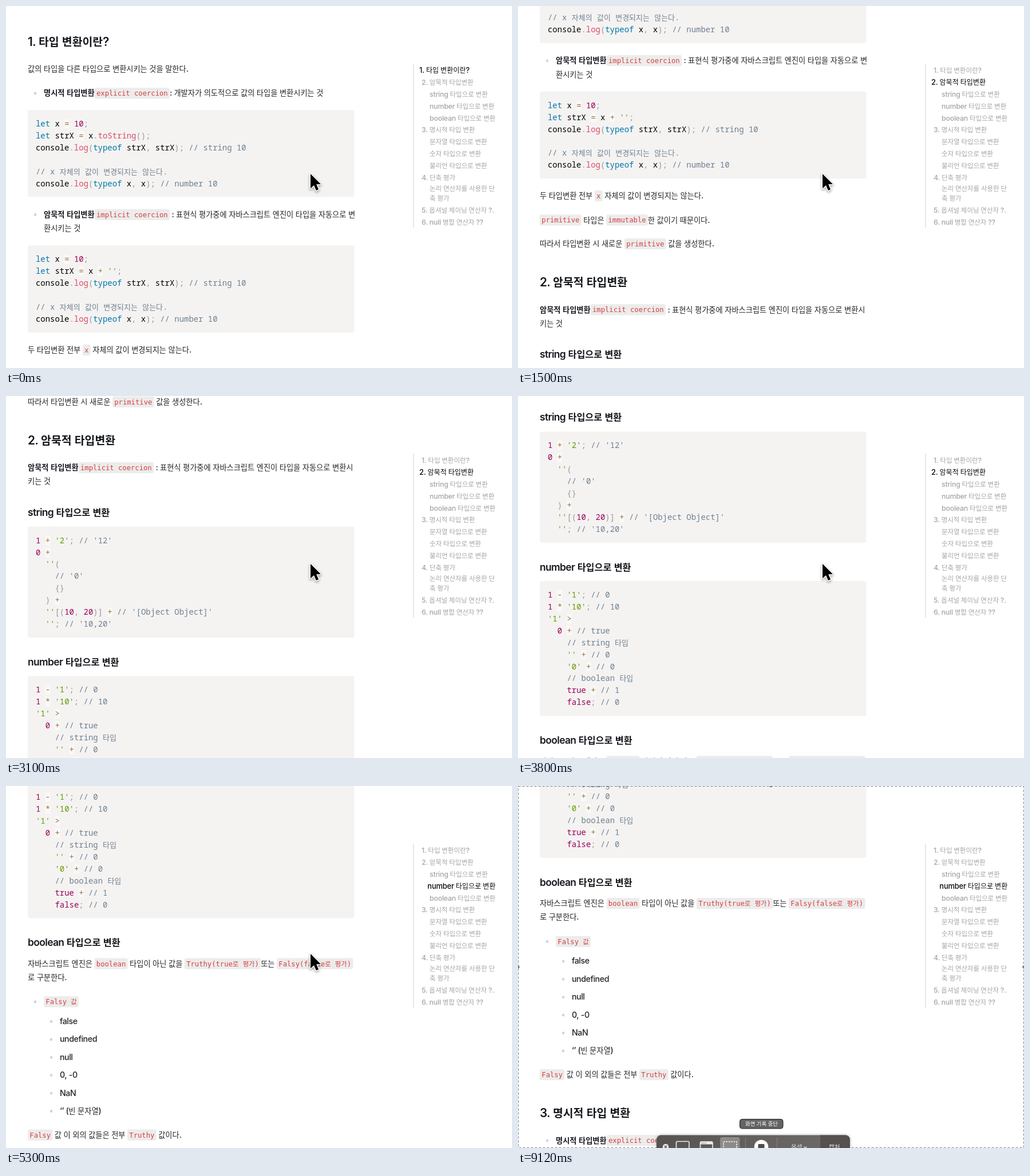
Write an HTML page with a canvas that moves like this. It is 884 by 634 pixels and loops after 9230 ms.

```html
<!DOCTYPE html>
<html lang="ko">
<head>
<meta charset="utf-8">
<style>
  html, body { margin: 0; width: 100%; height: 100%; overflow: hidden; background: #fff; }
  canvas { display: block; }
</style>
</head>
<body>
<canvas id="stage" width="884" height="634"></canvas>
<script>
const W = 884, H = 634, LOOP = 9230;
const ctx = document.getElementById('stage').getContext('2d');

const SANS = 'Inter, sans-serif';
const font = (size, o = {}) => ({ size, family: SANS, weight: 500, ls: -0.03, gap: 0.25, color: '#212529', ...o });
const mono = (size, family, color) => font(size, { family: family + ', monospace', ls: 0, gap: 0.601, color });
const BODY = font(14.2);
const BOLD = font(14.2, { weight: 700, color: '#181b20' });
const H2 = font(20.8, { weight: 700, ls: -0.04, color: '#14171c' });
const H3 = font(17.4, { weight: 700, ls: -0.035, color: '#14171c' });
const TOC = font(12.3, { ls: -0.015, gap: 0.235 });
const BADGE = mono(12.2, '"DejaVu Sans Mono"', '#d63f43');
const CODE = mono(13.93, '"Noto Sans Mono"', '#000');
const COLORS = {
  comment: '#708090', string: '#669900', keyword: '#0077aa', constant: '#990055',
  call: '#dd4a68', operator: '#9a6e3a', punctuation: '#999999'
};
const TOKEN = new RegExp([
  '(?<comment>//.*)', "(?<string>'[^']*')", '(?<keyword>let|typeof)',
  '(?<constant>true|false|\\d+)', '(?<call>\\w+(?=\\())', '(?<operator>[=+*>-])',
  '(?<punctuation>[.,;()\\[\\]{}])', '\\w+', ' +'
].join('|'), 'g');

const conversion = expr => [
  'let x = 10;', `let strX = ${expr};`, 'console.log(typeof strX, strX); // string 10', '',
  '// x 자체의 값이 변경되지는 않는다.', 'console.log(typeof x, x); // number 10'
];
const toStringCode = [
  "1 + '2'; // '12'", '0 +', "  ''(", "    // '0'", '    {}', '  ) +',
  "  ''[(10, 20)] + // '[Object Object]'", "  ''; // '10,20'"
];
const toNumberCode = [
  "1 - '1'; // 0", "1 * '10'; // 10", "'1' >", '  0 + // true', '    // string 타입',
  "    '' + // 0", "    '0' + // 0", '    // boolean 타입', '    true + // 1', '    false; // 0'
];
const explicitItem = '*명시적 타입변환*`explicit coercion`: 개발자가 의도적으로 값의 타입을 변환시키는 것';

const page = [
  [h2, 63, '1. 타입 변환이란?'],
  [para, 110, '값의 타입을 다른 타입으로 변환시키는 것을 말한다.'],
  [item, 152.5, explicitItem],
  [code, 206, conversion('x.toString()')],
  [item, 365, '*암묵적 타입변환*`implicit coercion` : 표현식 평가중에 자바스크립트 엔진이 타입을 자동으로 변'],
  [para, 389.5, '환시키는 것', 66],
  [code, 443.4, conversion("x + ''")],
  [para, 602, '두 타입변환 전부 `x` 자체의 값이 변경되지는 않는다.'],
  [para, 644.2, '`primitive` 타입은 `immutable`한 값이기 때문이다.'],
  [para, 686, '따라서 타입변환 시 새로운 `primitive` 값을 생성한다.'],
  [h2, 753.8, '2. 암묵적 타입변환'],
  [para, 801.2, '*암묵적 타입변환*`implicit coercion` : 표현식 평가중에 자바스크립트 엔진이 타입을 자동으로 변환시'],
  [para, 825.2, '키는 것'],
  [h3, 879.5, 'string 타입으로 변환'],
  [code, 928.6, toStringCode],
  [h3, 1141.6, 'number 타입으로 변환'],
  [code, 1190.2, toNumberCode],
  [h3, 1445, 'boolean 타입으로 변환'],
  [para, 1481.7, '자바스크립트 엔진은 `boolean` 타입이 아닌 값을 `Truthy(true로 평가)`또는 `Falsy(false로 평가)`'],
  [para, 1505.9, '로 구분한다.'],
  [item, 1548.4, '`Falsy 값`'],
  ...['false', 'undefined', 'null', '0, -0', 'NaN', '‘’ (빈 문자열)']
    .map((s, i) => [item, 1582.9 + i * 31.4, s, 94]),
  [para, 1781.8, '`Falsy` 값 이 외의 값들은 전부 `Truthy` 값이다.'],
  [h2, 1849.4, '3. 명시적 타입 변환'],
  [item, 1897, explicitItem]
];

// text, left edge, centre
const toc = [
  ['1. 타입 변환이란?', 726, 112.5], ['2. 암묵적 타입변환', 726, 133.4],
  ['string 타입으로 변환', 740, 154.4], ['number 타입으로 변환', 740, 175.3],
  ['boolean 타입으로 변환', 740, 196.2], ['3. 명시적 타입 변환', 726, 217.1],
  ['문자열 타입으로 변환', 740, 238], ['숫자 타입으로 변환', 740, 259],
  ['불리언 타입으로 변환', 740, 280], ['4. 단축 평가', 726, 301],
  ['논리 연산자를 사용한 단', 740, 319.3], ['축 평가', 740, 336.7],
  ['5. 옵셔널 체이닝 연산자 ?.', 726, 357.6], ['6. null 병합 연산자 ??', 726, 378.5]
];
const tocSwitches = [[-1000, 0], [1000, 1], [5000, 3]];

// time, offset, speed in px/ms
const scrollKeys = [
  [0, 0, 0.13], [1500, 269.6, 0.21], [2400, 502.6, 0.25],
  [3800, 842.1, 0.23], [5300, 1170.9, 0.125], [6500, 1276.4, 0.02]
];

const clamp = v => Math.max(0, Math.min(1, v));
const mix = (a, b, k) => a + (b - a) * k;

function box(x, y, w, h, r, fill, stroke) {
  ctx.beginPath();
  ctx.roundRect(x, y, w, h, r);
  if (fill) { ctx.fillStyle = fill; ctx.fill(); }
  if (stroke) { ctx.strokeStyle = stroke; ctx.stroke(); }
}

function disc(x, y, r, fill) {
  ctx.beginPath();
  ctx.arc(x, y, r, 0, Math.PI * 2);
  ctx.fillStyle = fill;
  ctx.fill();
}

function line(...pts) {
  ctx.beginPath();
  for (let i = 0; i < pts.length; i += 2) ctx.lineTo(pts[i], pts[i + 1]);
  ctx.stroke();
}

// Draws text centred on y and returns the x after it.
function text(x, y, str, f, color = f.color, draw = true) {
  ctx.fillStyle = color;
  for (const part of str.match(/[가-힣]+| +|[^가-힣 ]+/g) || []) {
    if (part[0] === ' ') { x += part.length * f.gap * f.size; continue; }
    const hangul = /[가-힣]/.test(part);
    ctx.font = hangul
      ? `${f.weight} ${f.size * 0.932}px "Noto Sans CJK KR", "Noto Sans CJK", sans-serif`
      : `${Math.min(f.weight, 600)} ${f.size}px ${f.family}`;
    ctx.letterSpacing = (hangul ? 0 : f.ls * f.size) + 'px';
    if (draw) ctx.fillText(part, x, y + f.size * 0.35);
    x += ctx.measureText(part).width;
  }
  return x;
}

function badge(x, y, str) {
  const w = text(0, 0, str, BADGE, BADGE.color, false) + 6.6;
  box(x, y - 9.3, w, 19.2, 3, '#ececeb');
  text(x + 3.3, y + 0.6, str, BADGE);
  return x + w;
}

function para(y, str, x = 38) {
  for (const part of str.split(/(`[^`]+`|\*[^*]+\*)/)) {
    if (part[0] === '`') x = badge(x, y, part.slice(1, -1));
    else if (part[0] === '*') x = text(x, y, part.slice(1, -1), BOLD);
    else x = text(x, y, part, BODY);
  }
}

function item(y, str, x = 66) {
  disc(x - 15, y + 0.5, 2.4, '#d3d5d8');
  para(y, str, x);
}

function h2(y, str) { text(38, y, str, H2); }
function h3(y, str) { text(38, y, str, H3); }

function code(y, lines) {
  const pitch = 20.93;
  box(38, y - 24, 570.5, lines.length * pitch + 27, 4, '#f4f3f2');
  lines.forEach((str, i) => {
    let x = 52;
    const cy = y + i * pitch;
    for (const m of str.matchAll(TOKEN)) {
      const kind = Object.keys(COLORS).find(k => m.groups[k]);
      if (kind === 'operator') box(x, cy - 8, 8.36, 16.5, 0, 'rgba(255,255,255,.5)');
      x = text(x, cy, m[0], CODE, COLORS[kind] || '#000');
    }
  });
}

function scrollAt(t) {
  const n = scrollKeys.findIndex(k => k[0] > t);
  if (n < 0) return scrollKeys[scrollKeys.length - 1][1];
  const [t0, y0, v0] = scrollKeys[n - 1], [t1, y1, v1] = scrollKeys[n];
  const d = t1 - t0, u = (t - t0) / d, u2 = u * u, u3 = u2 * u;
  return y0 + (y1 - y0) * (3 * u2 - 2 * u3) + d * (v0 * (u3 - 2 * u2 + u) + v1 * (u3 - u2));
}

function drawToc(t) {
  box(711, 101, 1.6, 287, 0, '#e0e1e3');
  const n = tocSwitches.filter(s => s[0] <= t).length - 1;
  const k = clamp((t - tocSwitches[n][0]) / 100 + 0.5);
  const previous = n > 0 ? tocSwitches[n - 1][1] : -1;
  toc.forEach(([str, x, y], i) => {
    const on = i === tocSwitches[n][1] ? k : i === previous ? 1 - k : 0;
    const shade = Math.round(mix(165, 10, on));
    const cx = (x + 886) / 2, s = 1 + 0.05 * on;
    ctx.save();
    ctx.translate(cx, y);
    ctx.scale(s, s);
    text(x - cx, 0, str, TOC, `rgb(${shade},${shade},${shade})`);
    ctx.restore();
  });
}

function drawCursor(x, y) {
  const pts = [0, 0, 0, 17, 4, 13.3, 6.6, 19.4, 9.4, 18.2, 6.8, 12.2, 12, 12];
  ctx.save();
  ctx.translate(x, y);
  ctx.scale(1.5, 1.5);
  ctx.beginPath();
  for (let i = 0; i < pts.length; i += 2) ctx.lineTo(pts[i], pts[i + 1]);
  ctx.closePath();
  ctx.lineJoin = 'round';
  ctx.lineWidth = 1.9;
  ctx.strokeStyle = '#fff';
  ctx.shadowColor = 'rgba(0,0,0,.4)';
  ctx.shadowBlur = 4;
  ctx.shadowOffsetY = 2;
  ctx.stroke();
  ctx.shadowColor = 'transparent';
  ctx.fillStyle = '#000';
  ctx.fill();
  ctx.restore();
}

function drawSelection() {
  ctx.lineWidth = 1;
  ctx.strokeStyle = '#808080';
  ctx.setLineDash([4, 3]);
  ctx.strokeRect(0.5, 0.5, W - 1, H - 1);
  ctx.setLineDash([]);
  for (const [x, y] of [[442, -0.5], [442, H], [0, 317], [W, 317]]) disc(x, y, 2.8, '#808080');
}

function drawToolbar() {
  const fill = ctx.createLinearGradient(242, 0, 528, 0);
  fill.addColorStop(0, '#575351');
  fill.addColorStop(1, '#6c6866');
  ctx.save();
  ctx.shadowColor = 'rgba(0,0,0,.3)';
  ctx.shadowBlur = 5;
  box(242, 611.5, 338, 50, 8, fill);
  ctx.restore();
  box(528, 611.5, 52, 50, [0, 8, 8, 0], '#55514f');

  const ink = '#ededed';
  disc(258, 632, 5.2, ink);
  ctx.lineWidth = 1.3;
  ctx.strokeStyle = '#575351';
  line(255.8, 629.8, 260.2, 634.2);
  line(260.2, 629.8, 255.8, 634.2);
  ctx.lineWidth = 1.6;
  box(276.5, 622.5, 22.5, 17, 2, null, ink);
  box(318.5, 623, 21.5, 17, 2, null, ink);
  box(318.5, 623, 21.5, 4.5, [2, 2, 0, 0], ink);
  for (let i = 0; i < 3; i++) disc(321.5 + i * 3, 625.2, 0.8, '#5f5b59');
  box(353, 615, 34.5, 34, 4, '#8d8a88');
  ctx.setLineDash([2.6, 1.8]);
  box(359, 623, 23, 17, 0, null, '#fff');
  ctx.setLineDash([]);
  box(397, 616, 1, 20, 0, '#85817f');
  box(452, 616, 1, 20, 0, '#85817f');
  disc(425, 632, 12.3, '#fff');
  box(419.5, 627, 11, 11, 1.5, '#4d4a48');
  const label = font(11.5, { color: '#e6e6e6' });
  text(477, 632, '옵션', label);
  ctx.lineWidth = 1.2;
  ctx.strokeStyle = '#e6e6e6';
  line(499.5, 631.5, 502, 634, 504.5, 631.5);
  text(543, 631.5, '캡처', label);
}

function drawTooltip() {
  ctx.lineWidth = 1;
  box(387.5, 583.5, 75.5, 16.5, 4, '#646363', '#1e1e1e');
  text(397, 591.5, '화면 기록 중단', font(10.1, { color: '#fff' }));
}

function cursorAt(t) {
  if (t < 8000) return [532, 294];
  if (t < 8400) return [526, 275];
  const u = clamp((t - 8300) / 500), e = u * u * (3 - 2 * u);
  return [mix(526, 424, e), mix(275, 621, e)];
}

function render(time) {
  const t = Math.floor(time / 100) * 100;
  ctx.fillStyle = '#fff';
  ctx.fillRect(0, 0, W, H);
  const top = scrollAt(t);
  for (const [draw, y, ...rest] of page) {
    if (y - top < H + 40 && y - top > -240) draw(y - top, ...rest);
  }
  drawToc(t);
  if (t >= 8000) {
    ctx.globalAlpha = clamp((t - 7900) / 300);
    drawSelection();
    drawToolbar();
    ctx.globalAlpha = 1;
  }
  if (t >= 8900) drawTooltip();
  if (time < 9120) drawCursor(...cursorAt(t));
}

const start = performance.now();
function tick() {
  render((performance.now() - start) % LOOP);
  requestAnimationFrame(tick);
}
tick();
</script>
</body>
</html>
```
